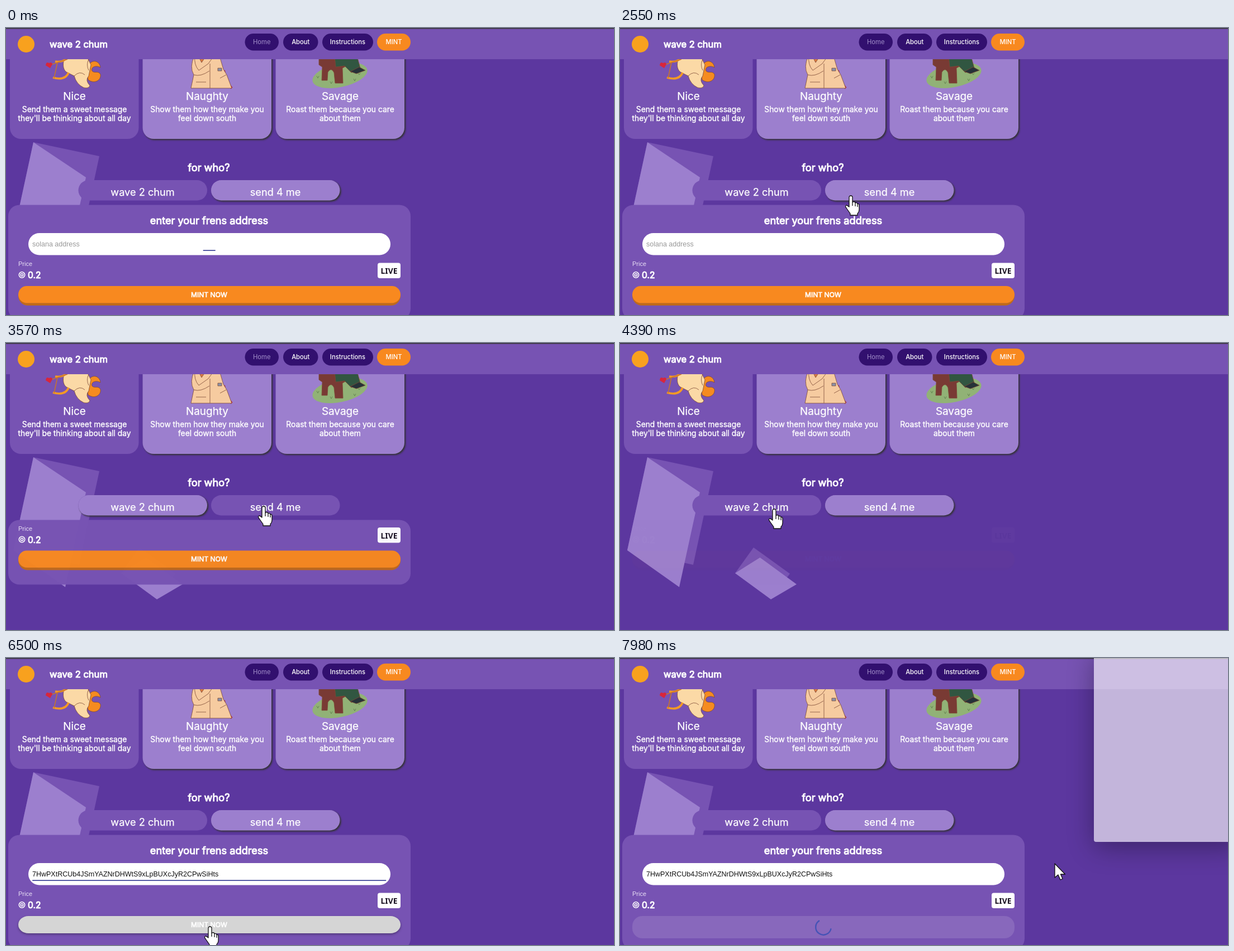
These frames come from a looping animation (1088x515 px, 8 s). An HTML page:

```html
<!DOCTYPE html>
<html lang="en">
<head>
<meta charset="utf-8">
<title>Mint page</title>
<style>
html, body { margin: 0; width: 100%; height: 100%; overflow: hidden; background: #5c379f; }
svg { display: block; }
text { font-family: Inter, "Open Sans", sans-serif; fill: #fff; text-anchor: middle; }
.nav { font-size: 11.2px; font-weight: 500; }
.title { font-size: 18.9px; stroke: #fff; stroke-width: .25px; }
.desc { font-size: 13.8px; stroke: #fff; stroke-width: .35px; }
.pill { font-size: 18.2px; stroke: #fff; stroke-width: .25px; }
.bold { font-size: 18.2px; stroke: #fff; stroke-width: .95px; }
.left { text-anchor: start; }
.arial { font-family: "Liberation Sans", Arial, sans-serif; text-anchor: start; }
.dark { fill: #7753b3; }
.light { fill: #9c7fce; }
.raised { filter: drop-shadow(2.5px 2.5px 1.5px #333); }
.ink { stroke: #7d4a35; stroke-width: .8; }
</style>
</head>
<body>
<svg id="stage" width="1088" height="515" viewBox="0 0 1088 515">
  <rect width="1088" height="515" fill="#5c379f"/>
  <path class="dark" d="M49 205 167 230 131 398 13 372Z"/>
  <path class="light" d="M49 205 143 268 106 438 13 372Z"/>
  <path class="dark" d="M239 367 304 414 270 459 206 413Z"/>
  <path class="light" d="M250.500 385 316 433 270 460 206 413Z"/>

  <g id="cards"></g>
  <g class="ink">
    <path d="M147 93C158 101 171 94 169 83C165 76 158 82 154 77C151 70 162 66 169 71C168 59 155 56 149 65C144 73 150 82 146 87Z" fill="#f58b20"/>
    <path d="M106 50C101 62 101 74 108 79L122 86Q126 101 139 107Q149 109 150 103Q141 94 148 86L152 66 144 50Z" fill="#fbd9a6"/>
    <path d="M122 86Q132 76 141 84M148 56Q143 66 148 76" fill="none"/>
    <path d="M84 89Q106 95 112 80M88 60Q100 62 108 55" fill="none" stroke="#f59a24" stroke-width="3.5"/>
    <path d="M80 66 110 56M86 90 92 62" fill="none" stroke="#c9752a" stroke-width="1.5"/>
    <path d="M79 72 71 67Q72 60 77 63Q82 60 83 65Z" fill="#d8263c" stroke="none"/>
    <path d="M390 76Q392 96 404 108" fill="none" stroke="#b52440" stroke-width="4"/>
    <path d="M331 108 336 84Q328 70 337 50H382L389 74 395 84 404 108Z" fill="#f6cba0"/>
    <path d="M338 50Q336 66 345 76L362 64 372 50M336 84Q348 88 364 77M365 64V108M340 97H358M394 84 383 90" fill="none"/>
    <path d="M344 50 350 62 358 50Z" fill="#d97843"/>
    <path d="M379 72h7v5h-7Z" fill="#8b91a8"/>
  </g>
  <ellipse cx="597.500" cy="85" rx="50" ry="21" transform="rotate(-12 597.500 85)" fill="#91b276"/>
  <path d="M556 86l2 4 2-4M580 96l2 4 2-4M622 91l2 4 2-4M630 81l2 3 2-3" fill="none" stroke="#668552"/>
  <g class="ink">
    <path d="M560 56H609V68L602 72 603 99H589L587 80Q582 70 576 79L575 94H565L566 70 560 66Z" fill="#793a34"/>
    <path d="M588 50H628L634 72 618 80 606 68 590 70Z" fill="#315641"/>
    <path d="M616 78 632 70 643 76 627 82Z" fill="#263238"/>
  </g>

  <rect width="1088" height="56" class="dark"/>
  <rect width="1088" height="1.6" fill="#39363e"/>
  <circle cx="36" cy="29" r="15" fill="#f8a11e"/>
  <text class="bold left" x="78" y="35" style="font-size:16.5px">wave 2 chum</text>
  <g id="nav"></g>
  <text class="bold" x="363" y="257">for who?</text>
  <g id="pills"></g>

  <g id="panel">
    <rect id="box" class="dark" x="4" y="317.500" width="720" rx="20"/>
    <g id="entry">
      <text class="bold" x="363.5" y="352">enter your frens address</text>
      <rect x="40" y="368" width="648" height="39.5" rx="19.7" fill="#fff"/>
      <text id="value" class="arial" x="47" y="392" font-size="12.5"></text>
      <rect id="underline" y="398.3" height="1.7" fill="#3a4296"/>
    </g>
    <g id="lower">
      <text class="arial" x="22" y="427" font-size="11" style="fill:#e9e0f5">Price</text>
      <g fill="none" stroke="#fff" stroke-width="1.6">
        <circle cx="28.5" cy="443" r="5.2"/><circle cx="28.5" cy="443" r="2.2"/>
      </g>
      <text class="bold left" x="39" y="449" style="font-size:15.6px">0.2</text>
      <rect x="665" y="421.5" width="41" height="27.5" rx="4" fill="#fff"/>
      <text x="685.5" y="441" style="font:bold 13.8px 'Noto Sans',sans-serif;fill:#181020">LIVE</text>
      <rect id="loading" x="22" y="463" width="684" height="40" rx="18" fill="#fff" fill-opacity=".12"/>
      <rect id="hover" x="22" y="463" width="684" rx="18" fill="#d5d5d5" style="filter:drop-shadow(0 2px 2px #0005)"/>
      <g id="orange">
        <rect x="22" y="464" width="684" height="34" rx="17" fill="#bf6a1c"/>
        <rect x="22" y="463" width="684" height="30.5" rx="15.2" fill="#f8891f"/>
      </g>
      <text id="mint" class="bold" x="363.5" y="482.5" style="font-size:12.1px;stroke-width:.7px">MINT NOW</text>
      <path id="spinner" fill="none" stroke="#3f51b5" stroke-width="2.45" stroke-opacity=".9"/>
    </g>
  </g>

  <rect id="popup" x="848" y="-12" width="260" height="342" rx="4" fill="#fff" style="filter:drop-shadow(0 10px 24px #0008)"/>
  <g id="cursor" fill="#fff" stroke="#111" stroke-width="1.3" stroke-linejoin="round">
    <path id="arrow" d="M0 0V25L6 20 10 29 14 27 10.500 19H18.500Z"/>
    <path id="hand" d="M-3 3Q-3 0 0 0T3 3V12Q7 9 8 13Q11 11 12 15Q15 13 15 18V25Q15 29 12 32V35H-1V32L-8 22Q-11 18 -8 17Q-6 17 -3 20ZM3 12V18M8 13V19M12 15V20"/>
    <path id="beam" d="M-4 -9H4M0 -9V9M-4 9H4" stroke="#222"/>
  </g>
</svg>
<script>
const $ = id => document.getElementById(id);
const set = (id, attrs) => { for (const k in attrs) $(id).setAttribute(k, attrs[k]); };
const show = (id, on) => set(id, { visibility: on ? "visible" : "hidden" });
const clamp = x => Math.max(0, Math.min(1, x));
const smooth = x => { x = clamp(x); return x * x * (3 - 2 * x); };
const ramp = (t, start, end) => smooth((t - start) / (end - start));

const ADDRESS = "7HwPXtRCUb4JSmYAZNrDHWtS9xLpBUXcJyR2CPwSiHts";
const CLICK_ME = 3120, CLICK_FREN = 4020, FOCUS = 4960, PASTE = 6050;
const HOVER = 6215, SUBMIT = 7010, SPIN = 7040;

$("cards").innerHTML = [
  [7, "Nice", "Send them a sweet message", "they'll be thinking about all day"],
  [244.5, "Naughty", "Show them how they make you", "feel down south"],
  [482.5, "Savage", "Roast them because you care", "about them"]
].map(([x, name, a, b], i) => `
  <rect class="${i ? "light raised" : "dark"}" x="${x}" y="10" width="230.5" height="189" rx="20"/>
  <text class="title" x="${x + 115.5}" y="129">${name}</text>
  <text class="desc" x="${x + 115.5}" y="151">${a}</text>
  <text class="desc" x="${x + 115.5}" y="166.500">${b}</text>`).join("");

$("nav").innerHTML = [
  [427.5, 60.5, "Home", "#32106f", "#927dbd"], [496, 62.5, "About", "#32106f", "#fff"],
  [566, 91, "Instructions", "#32106f", "#fff"], [664, 60, "MINT", "#f8891f", "#fff"]
].map(([x, w, label, fill, color]) => `
  <rect x="${x}" y="10" width="${w}" height="30.500" rx="15.200" fill="${fill}"/>
  <text class="nav" x="${x + w / 2}" y="28.500" style="fill:${color}">${label}</text>`).join("");

$("pills").innerHTML = [[129.5, "wave 2 chum", "fren"], [367, "send 4 me", "me"]]
  .map(([x, label, id]) => {
    const shape = `x="${x}" y="273" width="230.500" height="36.500" rx="18.200"`;
    return `<rect class="dark" ${shape}/><rect id="${id}" class="light raised" ${shape}/>
      <text class="pill" x="${x + 115}" y="300.500">${label}</text>`;
  }).join("");

// Rows of [time, ...values], interpolated linearly
function track(t, rows) {
  const i = rows.findIndex(r => r[0] > t);
  if (i === 0) return rows[0].slice(1);
  if (i < 0) return rows[rows.length - 1].slice(1);
  const a = rows[i - 1], b = rows[i], k = (t - a[0]) / (b[0] - a[0]);
  return a.slice(1).map((v, j) => v + (b[j + 1] - v) * k);
}

const PATH = [
  [1450, 702, 512], [1700, 570, 430], [2000, 380, 325], [2210, 308, 300], [2280, 287, 303],
  [2550, 413, 301], [2760, 413, 301], [2810, 461, 293], [3640, 461, 293], [3920, 288, 300],
  [4000, 276, 298], [4530, 276, 298], [4810, 350, 377], [4960, 364, 388], [5420, 364, 388],
  [5560, 360.5, 447], [6050, 360.5, 447], [6400, 365, 482], [7200, 365, 482],
  [7660, 758, 372], [7740, 778, 369]
];
const FADE = [
  [CLICK_ME, 1], [3340, 0], [3570, .97], [3600, 1], [4090, 1],
  [4390, .015], [4529, .015], [4530, 0], [4810, 1]
];

function drawCursor(t) {
  const [x, y] = track(t, PATH);
  const onPill = y > 273 && y < 309.5 && x > 129 && x < 598 && !(x > 360 && x < 367);
  const onButton = y > 463 && t > PASTE && t < SUBMIT;
  const onInput = y > 368 && y < 407 && t > 4530 && t < PASTE;
  const kind = onPill || onButton ? "hand" : onInput ? "beam" : "arrow";
  for (const k of ["hand", "beam", "arrow"]) set(k, { display: k === kind && t >= 1450 ? "inline" : "none" });
  set("cursor", { transform: `translate(${x} ${y})` });
}

function drawSpinner(t) {
  show("spinner", t > SPIN);
  if (t <= SPIN) return;
  const p = ((t - SPIN) / 1400) % 1, grow = smooth(p * 2), drop = smooth(p * 2 - 1);
  const from = 15 * grow + 110 * drop, to = Math.min(126, from + 1 + 99 * grow);
  const point = v => {
    const a = (v / 126.9 + p) * 2 * Math.PI;
    return `${364 + 13.8 * Math.cos(a)} ${483 + 13.8 * Math.sin(a)}`;
  };
  set("spinner", { d: `M${point(from)}A13.8 13.8 0 ${to - from > 63 ? 1 : 0} 1 ${point(to)}` });
}

function draw(t) {
  const forMe = ramp(t, CLICK_ME, CLICK_ME + 250) - ramp(t, CLICK_FREN, CLICK_FREN + 250);
  set("fren", { opacity: forMe });
  set("me", { opacity: 1 - forMe });

  const compact = t >= 3340 && t < 4530;
  set("panel", { opacity: track(t, FADE)[0] });
  set("box", { height: compact ? 116 : 206 });
  set("entry", { display: compact ? "none" : "inline" });
  set("lower", { transform: `translate(0 ${compact ? -90.5 : 0})` });

  const pasted = t >= PASTE, focused = t >= FOCUS;
  $("value").textContent = pasted ? ADDRESS : "solana address";
  $("value").style.fill = pasted ? "#111" : focused ? "#9a83b5" : "#999";
  const line = t < 70 ? 22 : 633 * (ramp(t, FOCUS, FOCUS + 220) - ramp(t, 6910, 7100));
  set("underline", { x: 363.7 - line / 2, width: line });

  const loading = t >= SUBMIT;
  show("loading", loading);
  show("mint", !loading);
  set("orange", { opacity: 1 - ramp(t, HOVER, HOVER + 250) });
  set("hover", { opacity: t < HOVER ? 0 : 1 - clamp((t - SUBMIT) / 250), height: loading ? 40 : 31 });
  drawSpinner(t);

  set("popup", { opacity: .63 * clamp((t - 7860) / 120) });
  drawCursor(t);
}

function frame(now) {
  draw(now % 8000);
  requestAnimationFrame(frame);
}
draw(0);
requestAnimationFrame(frame);
</script>
</body>
</html>
```
